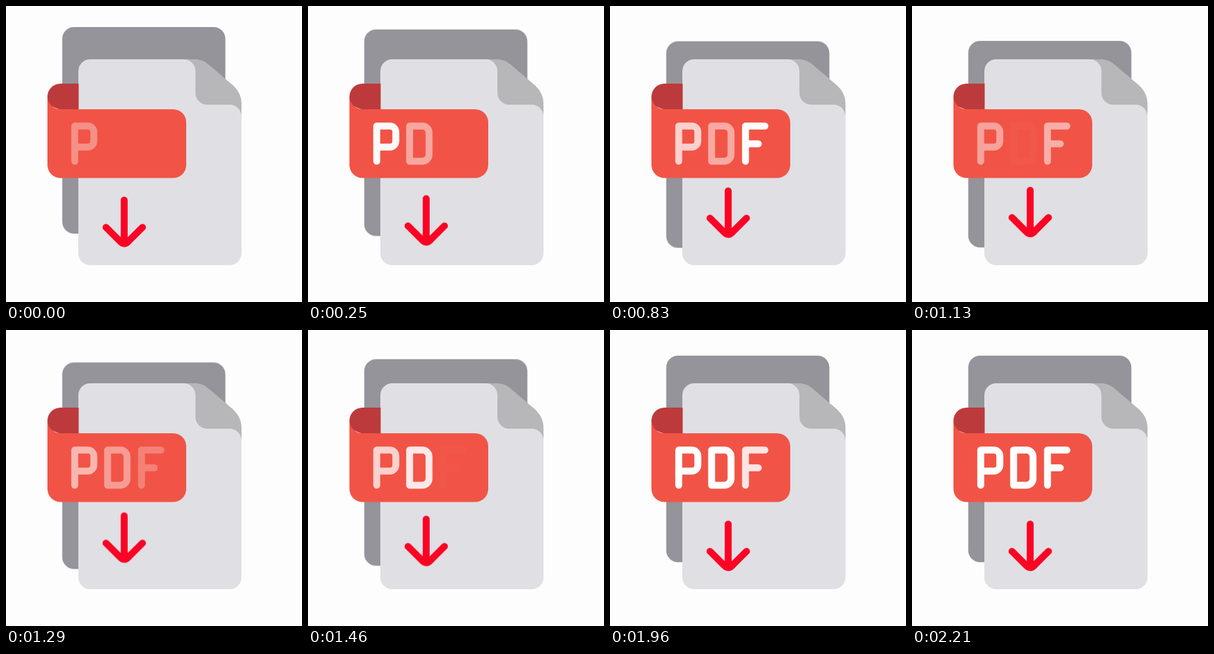
An HTML page for the animation above (2.25 s loop, 450 by 450 pixels).

```html
<!DOCTYPE html>
<html lang="en">
<head>
<meta charset="utf-8">
<title>PDF download</title>
<style>
  html, body { margin: 0; width: 100%; height: 100%; overflow: hidden; background: #fdfdfd; }
  svg { display: block; width: 100vw; height: 100vh; }
  .line { fill: none; stroke: #fff; stroke-width: 10.5; stroke-linecap: round; stroke-linejoin: round; }
  #arrow { stroke: #fb0324; }
</style>
</head>
<body>
<svg viewBox="0 0 450 450" role="img" aria-label="PDF download">
  <rect id="back" x="85.5" y="32" width="248" height="314" rx="18" fill="#94949a"/>

  <!-- front page and its folded corner -->
  <path fill="#dfdfe4" d="M128 81H290L358 160V376a18 18 0 0 1-18 18H128a18 18 0 0 1-18-18V99a18 18 0 0 1 18-18Z"/>
  <path fill="#b7b7b9" d="M270 81H286C294 81 301 83 308 89L342 118C352 126 358 136 358 148V168C358 158 350 150 340 150H306a18 18 0 0 1-18-18V99a18 18 0 0 0-18-18Z"/>

  <!-- ribbon: shaded back, then the label -->
  <path fill="#bd3a3c" d="M63 138a20 20 0 0 1 20-20H110.500V158H83L63 150Z"/>
  <path fill="#f15446" d="M63 137a20 20 0 0 0 20 20H254a20 20 0 0 1 20 20V241.500a20 20 0 0 1-20 20H83a20 20 0 0 1-20-20Z"/>

  <path id="p" class="line" d="M104.500 236V182.500H124.500a9 9 0 0 1 9 9V205.500a9 9 0 0 1-9 9H104.500"/>
  <path id="d" class="line" d="M154.500 182.500H174a10 10 0 0 1 10 10V226a10 10 0 0 1-10 10H154.500Z"/>
  <path id="f" class="line" d="M235.500 182.500H206V236M206 209.500H225.500"/>

  <path id="arrow" class="line" d="M179.700 295V359M152 336.400L173 357.400Q179.700 365 186.500 357.400L207.500 336.400"/>
</svg>
<script>
  const LOOP = 2250, STEPS = 54;

  const clamp = x => Math.min(1, Math.max(0, x));
  const ramp = (t, from, to) => clamp((t - from) / (to - from));
  const ease = (t, from, to) => (1 - Math.cos(Math.PI * ramp(t, from, to))) / 2;

  // samples a style rule over the loop
  function run(id, style) {
    const keys = Array.from({ length: STEPS + 1 }, (_, i) => style(i / STEPS * LOOP));
    document.getElementById(id).animate(keys, { duration: LOOP, iterations: Infinity });
  }

  const move = (id, y) => run(id, t => ({ transform: `translateY(${y(t)}px)` }));

  // letters appear one after another, then each dims around its own moment
  const letter = (id, order, { dim, low = 0, fall = 600, rise = 600 }) => run(id, t => {
    const start = 195 * order - 140;
    const away = clamp(t < dim ? (dim - t) / fall : (t - dim) / rise);
    return { opacity: Math.min(ramp(t, start, start + 400), low + (1 - low) * away) };
  });

  move('back', t => 22.5 * ease(t, 0, 950) - 15.5 * ease(t, 970, 1790));
  move('arrow', t => 15 * (ease(t, 1100, 1820) - ease(t, 0, 1000)));

  letter('p', 0, { dim: 1145, low: .44 });
  letter('d', 1, { dim: 1130, rise: 380 });
  letter('f', 2, { dim: 1450 });
</script>
</body>
</html>
```
